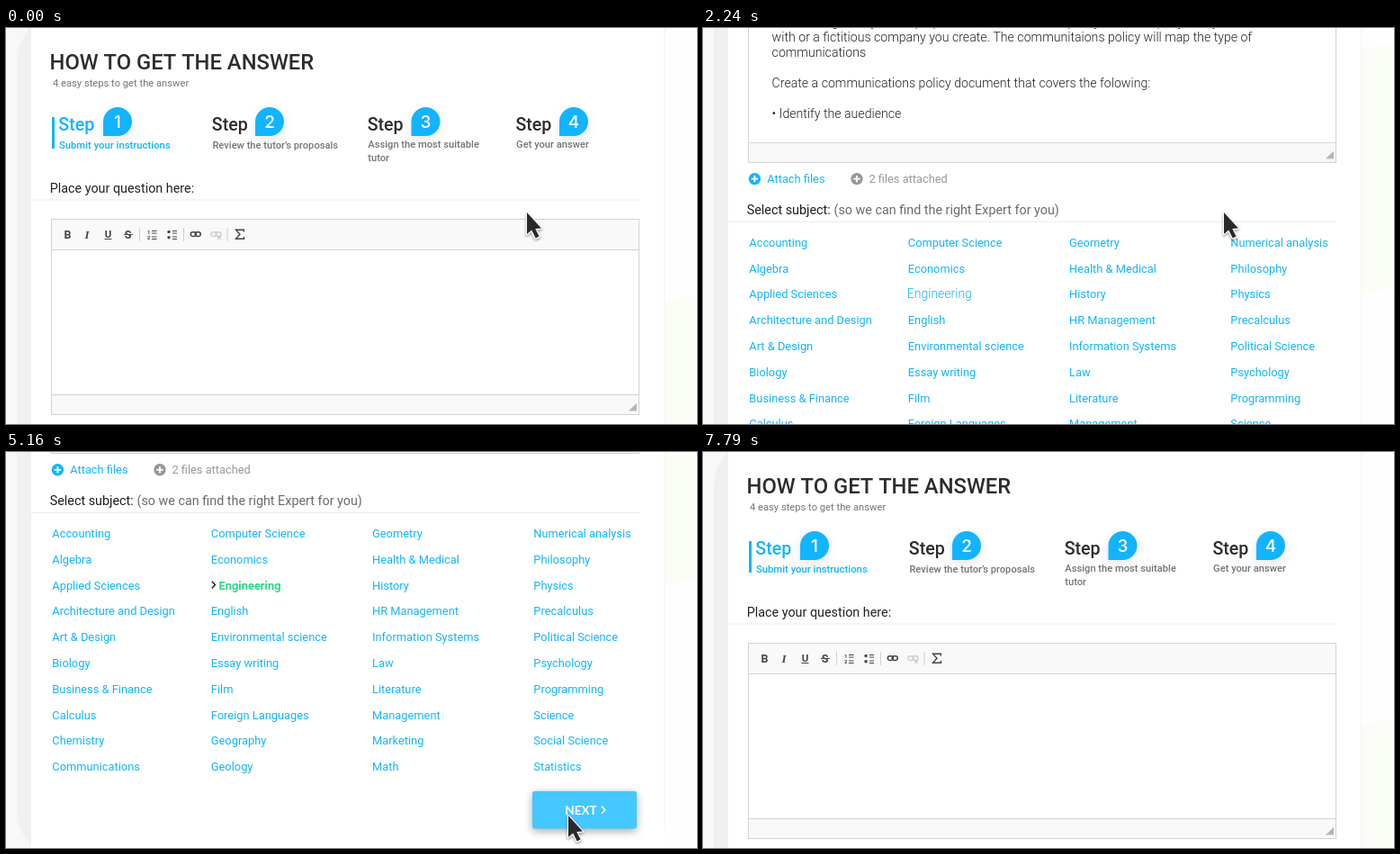
These frames come from a looping animation (768x440 px, 7860 ms). An HTML page with a canvas:

```html
<!DOCTYPE html>
<html lang="en">
<head>
<meta charset="utf-8">
<title>How to get the answer</title>
<style>
html, body { margin: 0; width: 100%; height: 100%; overflow: hidden; background: #fff; }
canvas { display: block; width: 768px; height: 440px; }
</style>
</head>
<body>
<canvas id="stage" width="768" height="440"></canvas>
<script>
const ctx = document.getElementById('stage').getContext('2d');
const LOOP = 7860, MAX_SCROLL = 428;
const BLUE = '#12b4ff', DARK = '#2d2d2f', GREY = '#757575';
const SANS = 'Roboto, sans-serif';

const copy = [
  [274, 'In this assigment you will prepare a communications policy for a company that you are familiar'],
  [291, 'with or a fictitious company you create. The communitaions policy will map the type of'],
  [308, 'communications'],
  [341.5, 'Create a communications policy document that covers the folowing:'],
  [375.5, '• Identify the auedience']
];
const copyLength = copy.reduce((n, line) => n + line[1].length, 0);

const subjects = [
  [51.3, 'Accounting|Algebra|Applied Sciences|Architecture and Design|Art & Design|Biology|Business & Finance|Calculus|Chemistry|Communications'],
  [227.8, 'Computer Science|Economics|Engineering|English|Environmental science|Essay writing|Film|Foreign Languages|Geography|Geology'],
  [407, 'Geometry|Health & Medical|History|HR Management|Information Systems|Law|Literature|Management|Marketing|Math'],
  [586.3, 'Numerical analysis|Philosophy|Physics|Precalculus|Political Science|Psychology|Programming|Science|Social Science|Statistics']
].map(([x, names]) => [x, names.split('|')]);

const clamp = v => Math.max(0, Math.min(1, v));
const span = (t, a, b) => clamp((t - a) / (b - a));
const mix = (a, b, p) => a + (b - a) * p;

// cubic-bezier(.33, 0, .67, 1)
function ease(p) {
  if (p <= 0 || p >= 1) return clamp(p);
  let lo = 0, hi = 1;
  for (let i = 0; i < 20; i++) {
    const s = (lo + hi) / 2, r = 1 - s;
    if (3 * r * r * s * 0.33 + 3 * r * s * s * 0.67 + s * s * s < p) lo = s; else hi = s;
  }
  return lo * lo * (3 - 2 * lo);
}

function text(str, x, y, size, color, weight = 400, family = SANS, align = 'left') {
  ctx.font = `${weight} ${size}px ${family}`;
  ctx.fillStyle = color;
  ctx.textAlign = align;
  ctx.fillText(str, x, y);
}

function box(x, y, w, h, color) {
  ctx.fillStyle = color;
  ctx.fillRect(x, y, w, h);
}

function path(points, color, width = 1, closed = false) {
  ctx.beginPath();
  points.forEach(([x, y]) => ctx.lineTo(x, y));
  if (closed) ctx.closePath();
  ctx.strokeStyle = color;
  ctx.lineWidth = width;
  ctx.stroke();
}

function rounded(x, y, w, h, r, color) {
  ctx.beginPath();
  ctx.roundRect(x, y, w, h, r);
  ctx.fillStyle = color;
  ctx.fill();
}

function disc(x, y, r, color) {
  ctx.beginPath();
  ctx.arc(x, y, r, 0, Math.PI * 2);
  ctx.fillStyle = color;
  ctx.fill();
}

function shadow(color, blur, dy) {
  ctx.shadowColor = color;
  ctx.shadowBlur = blur;
  ctx.shadowOffsetY = dy;
}
const noShadow = () => shadow('transparent', 0, 0);

function backdrop() {
  box(0, -20, 768, 1000, '#f8f8f8');
  rounded(12, -22, 400, 908, 62, '#f0f0f0');
  box(731, -20, 37, 1000, '#fefefe');
  ctx.beginPath();
  [[732, 303], [768, 297], [768, 570], [732, 576]].forEach(p => ctx.lineTo(...p));
  ctx.fillStyle = '#fbfef6';
  ctx.fill();
  box(28, -20, 703, 1000, '#fff');
  box(731, -20, 1.5, 868, '#f6f6f6');
}

function step(n, x, badge, lines, baseline, gap, active) {
  text('Step', x, 114, 19.6, active ? BLUE : DARK, 500);
  shadow('rgba(0,0,0,.1)', 14, 5);
  rounded(badge - 16, 88, 32, 32, [16, 16, 16, 0], BLUE);
  noShadow();
  text(n, badge, 111, 19, '#fff', 500, 'Inter, sans-serif', 'center');
  lines.forEach((s, i) =>
    text(s, x + 0.6, baseline + i * gap, active ? 11.3 : 11.15, active ? BLUE : GREY, 500));
}

function header(changed) {
  text('HOW TO GET THE ANSWER', 48.5, 45.5, 23.75, DARK, 500);
  text('4 easy steps to get the answer', 52, 64.5, 11.2, GREY);
  box(51, 99, 3, 35, BLUE);
  step('1', 58.3, 124, ['Submit your instructions'], 134, 0, true);
  step('2', 228.8, 293, [changed ? 'Submit your instructions' : 'Review the tutor’s proposals'], 134, 0);
  step('3', 401.7, 466.5, changed ? ['Review the tutor’s', 'proposals']
    : ['Assign the most suitable', 'tutor'], 133, changed ? 16.5 : 14.5);
  step('4', 566.5, 631, ['Get your answer'], 133, 0);
  text('Place your question here:', 48.7, 183, 14.35, '#222');
  box(28, 190.5, 676, 1, '#ebebeb');
}

function chain(x, color) {
  ctx.strokeStyle = color;
  ctx.lineWidth = 1.5;
  for (const dx of [0, 5]) {
    ctx.beginPath();
    ctx.roundRect(x + dx, 226.8, 6, 4.6, 2.3);
    ctx.stroke();
  }
}

function toolbar() {
  const ink = '#454545';
  text('B', 68.5, 233.7, 12.5, ink, 700, SANS, 'center');
  text('I', 90, 233.7, 13, ink, 'italic 700', 'Liberation Serif, serif', 'center');
  text('U', 113.5, 233, 11.5, ink, 700, SANS, 'center');
  box(109.5, 234, 8, 1, ink);
  text('S', 135.7, 233.7, 12.5, ink, 700, SANS, 'center');
  box(131, 229, 10, 1, ink);
  for (const x of [148, 197, 245.5]) box(x, 222, 1, 15, '#cfcfcf');
  text('1', 157, 229, 6, ink, 700);
  text('2', 157, 235, 6, ink, 700);
  for (const y of [225, 227.5, 231.5, 234]) {
    box(162, y, 5.5, 1, ink);
    box(185, y, 5, 1, ink);
  }
  disc(181, 226.5, 1.7, ink);
  disc(181, 232.8, 1.7, ink);
  chain(205.3, ink);
  chain(228, '#cfcfcf');
  path([[235, 231], [239, 235]], '#bbb');
  path([[239, 231], [235, 235]], '#bbb');
  path([[264.3, 226.5], [264.3, 224.3], [255.5, 224.3], [260, 229.2], [255.5, 234.3],
    [264.5, 234.3], [264.5, 232]], ink, 1.4);
}

function editor(typed) {
  box(50, 212, 654, 218, '#d2d2d2');
  box(51, 213, 652, 33, '#f9f9f9');
  box(51, 247, 652, 160, '#fff');
  box(51, 408, 652, 21, '#f8f8f8');
  toolbar();
  ctx.beginPath();
  [[701, 417], [701, 425.5], [692, 425.5]].forEach(p => ctx.lineTo(...p));
  ctx.fillStyle = '#b5b5b5';
  ctx.fill();
  let left = typed;
  for (const [y, line] of copy) {
    if (left <= 0) break;
    text(line.slice(0, left), 76.6, y + 4.6, 14.15, '#222', 300);
    left -= line.length;
  }
}

function plus(x, color) {
  disc(x, 447.8, 6.7, color);
  box(x - 3.7, 446.9, 7.4, 1.8, '#fff');
  box(x - 0.9, 444.1, 1.8, 7.4, '#fff');
}

function subjectList(plain) {
  plus(57.4, BLUE);
  text('Attach files', 71.2, 452.4, 12.85, BLUE);
  plus(171, '#979797');
  text('2 files attached', 184.5, 452.4, 12.8, '#979797');
  text('Select subject:', 48.7, 487, 14.35, '#1d1d1d');
  text('(so we can find the right Expert for you)', 145.5, 487, 14.35, '#6b6b6b');
  box(28, 495, 676, 1, '#ebebeb');
  for (const [x, names] of subjects) names.forEach((name, i) => {
    const y = 523 + i * 28.8;
    if (name !== 'Engineering') return text(name, x, y, 12.85, BLUE);
    ctx.globalAlpha = plain;
    text(name, x - 1, y, 14, BLUE, 300);
    ctx.globalAlpha = 1;
  });
}

function chosen(alpha) {
  ctx.globalAlpha = alpha;
  path([[228.8, 571.8], [232.4, 575.6], [228.8, 579.4]], '#222', 1.5);
  text('Engineering', 236.6, 580.6, 12.85, '#27d884', 700);
  ctx.globalAlpha = 1;
}

function nextButton(hover) {
  ctx.save();
  ctx.translate(643, 825.7);
  ctx.scale(1 + hover * 0.02, 1 + hover * 0.02);
  shadow(`rgba(0,0,0,${mix(0.22, 0.36, hover)})`, mix(4, 10, hover), mix(2, 3, hover));
  rounded(-57, -20.5, 114, 41, 3, `rgb(${mix(32, 74, hover)},${mix(186, 201, hover)},255)`);
  noShadow();
  text('NEXT', -21.3, 4.8, 13.3, '#fff', 700, 'Lato, sans-serif');
  path([[18.6, -4], [22.4, 0], [18.6, 4]], '#fff', 1.5);
  ctx.restore();
}

const arrow = [[0, 0], [0, 24], [5.2, 19.6], [9.7, 28.6], [13.6, 26.6], [9.2, 18], [16, 17.5]];

function cursor(x, y, alpha) {
  if (alpha <= 0) return;
  ctx.save();
  ctx.globalAlpha = alpha;
  ctx.translate(x, y);
  ctx.lineJoin = 'round';
  shadow('rgba(0,0,0,.4)', 3, 1.5);
  path(arrow, '#fff', 2.4, true);
  noShadow();
  ctx.beginPath();
  arrow.forEach(p => ctx.lineTo(...p));
  ctx.fillStyle = '#29292d';
  ctx.fill();
  ctx.restore();
}

function cursorAt(t) {
  if (t < 3280) {
    const p = ease(span(t, 2735, 3195));
    return [mix(579, 264, p), mix(205, 148, p)];
  }
  const p = ease(span(t, 3280, 4005));
  return [mix(264, 625, p), mix(148, 404, p) - 84 * p * (1 - p)];
}

function hoverAt(t) {
  const s = (a, b) => ease(span(t, a, b));
  return s(3840, 4010) - s(4265, 4555) + s(4935, 5225) - s(5575, 5805);
}

function dots(t) {
  ctx.globalAlpha = 1 - span(t, 7310, 7560);
  [0, 1, 2].forEach(i => {
    const p = span(t, 6320 + i * 210, 6510 + i * 210);
    const r = 10 * (p + 0.9 * p * Math.sin(p * Math.PI));
    if (r > 0) disc(359.5 + i * 25, 226.5, Math.min(r, 13), BLUE);
  });
  ctx.globalAlpha = 1;
}

function draw(t) {
  const restart = t > 6250;
  const fade = span(t, 5940, 6130);
  const picked = span(t, 3140, 3200);
  const scroll = restart ? 0 : MAX_SCROLL * ease(span(t, 1792, 2534));
  const typed = restart ? 0 : Math.ceil(copyLength * span(t, 1060, 1730));
  const veil = restart ? 1 - span(t, 7310, 7790) : fade;

  ctx.setTransform(1, 0, 0, 1, 0, 0);
  ctx.translate(0, -scroll);
  backdrop();
  header(!restart && t >= 1070);
  editor(typed);
  subjectList(fade > 0 ? clamp(fade * 2) : 1 - picked);
  nextButton(hoverAt(t));
  if (veil > 0) box(0, scroll, 768, 440, `rgba(255,255,255,${veil})`);
  if (!restart && picked > 0) chosen(picked * (1 - fade));

  ctx.setTransform(1, 0, 0, 1, 0, 0);
  if (t > 6320 && t < 7560) dots(t);
  const [x, y] = cursorAt(t);
  cursor(x, y, 1 - span(t, 6040, 6150));
}

const begin = performance.now();
function tick() {
  draw((performance.now() - begin) % LOOP);
  requestAnimationFrame(tick);
}
tick();
</script>
</body>
</html>
```
